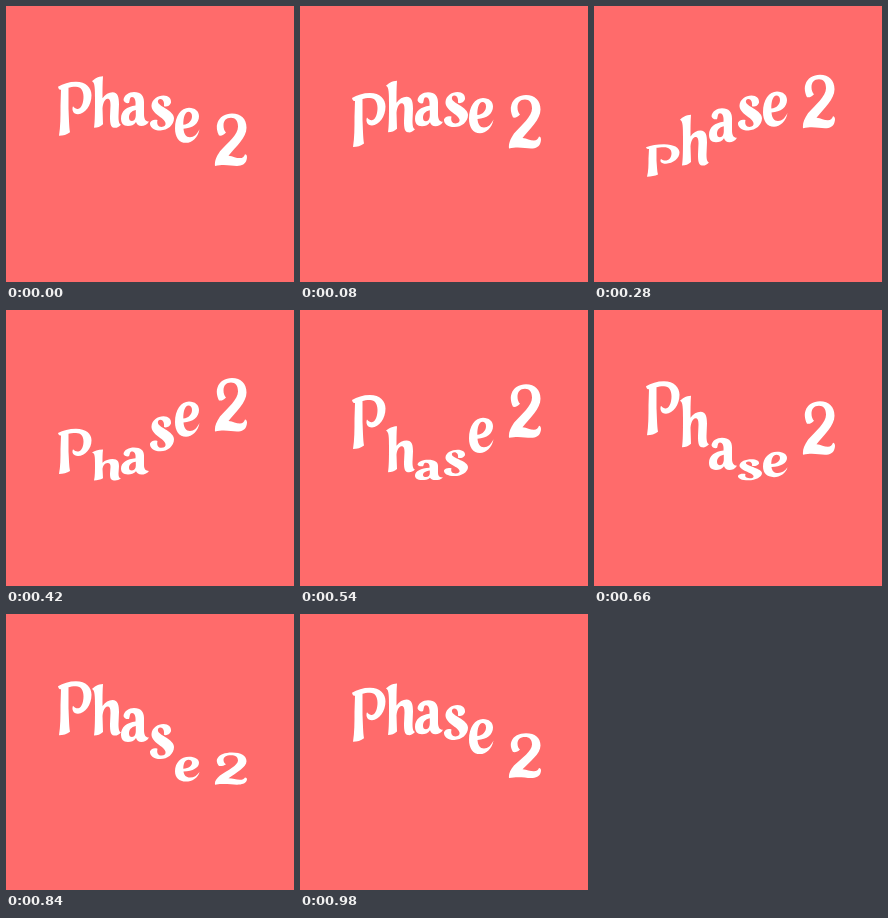
Animation of 288 by 276 pixels, one loop 1 s. Source, as an HTML page:

```html
<!DOCTYPE html>
<html lang="en">
<head>
<meta charset="utf-8">
<title>Phase 2</title>
<style>
html, body { margin: 0; width: 100%; height: 100%; overflow: hidden; background: #ff6b6b; }
svg { display: block; width: 288px; height: 276px; fill: #fff; fill-rule: evenodd; }
</style>
</head>
<body>
<svg viewBox="0 0 288 276" role="img" aria-label="Phase 2"></svg>
<script>
// Letter outlines: x on the stage, y from the middle of the line.
const letters = [
  // P
  `M52 -22C57 -25 63 -27 70 -27C80 -27 85.5 -21 85.5 -13.5C85.5 -3 79 5 72 5.5
   C67 5.5 65.5 1 67 -2.5C69 0 71 .5 72.5 0C76 -1 77.5 -7 77.5 -12C77.5 -18 75 -22 70 -22
   C66.5 -22 64 -21.5 62.5 -21L62.5 0C63 10 63 17 64 23.5C61 26 57 27 53 27
   C54.5 18 54.5 8 54.5 -3L55 -19C53.5 -19 52.5 -19.5 52 -22Z`,
  // h
  `M86 -20C88 -22 92 -25 97 -25C96.5 -18 96.5 -11 96.5 -3C99 -7 103 -9 106.5 -9
   C112 -9 113 -4 113 3L112.5 15C112.5 20 113 22.5 115 23.5C113 26 110 27 108 26.5
   C104.5 26 104 22 104 15L104.5 4C104.5 0 104 -2.5 101.5 -2.5C98.5 -2 97 2 96.5 7
   L97 23C94.5 25.5 91.5 26.5 88 26.5C89 20 89 10 89 -2C89 -12 89 -19 86 -20Z`,
  // a
  `M117.5 0C118 -5 123 -8 128 -8C135 -8 138 -4 138 2L138 14C138 19 139.5 21.5 143 21.5
   C141 25 138 26 135.5 26C132.5 26 131 24.5 130 22C128 25 125 26 122 26C117 26 115 23 115 18.5
   C115 11 121 6.5 129.5 5.5C130 0 128.5 -3 126 -3C123.5 -3 124 .5 123 3C120.5 3.5 118 2.5 117.5 0Z
   M129.8 10C125 11 123 14 123 17.5C123 20 124.2 21 126 21C128.5 21 129.8 18 129.8 15Z`,
  // s
  `M165 -1.2C163.5 2.3 160.5 3.2 158 2.3C158.5 -2 157 -5 154.5 -5C152.5 -5 151.5 -3.3 152 -1.6
   C153.5 3.2 168 6.6 168 14.4C168 21.3 161.5 26.5 154.5 26.5C147.5 26.5 143.5 23 144 18.7
   C145.5 15.7 148.5 15.2 151.5 16.1C150.5 20.4 152 23 155.5 23C158.5 23 160 21.3 159.5 19.1
   C158.5 13.5 145 10 145.5 1.4C146 -4.6 151.5 -8.5 157.5 -8.5C162.5 -8.5 165.5 -5.5 165 -1.2Z`,
  // e
  `M193.5 13C192 21.5 186 26.7 180 26.7C173 26.7 169 21 169 12C169 0 175 -8.5 183 -8.5
   C189 -8.5 193 -5 193 0C193 7 187 12 177.5 12.5C178 18 180 21 184 21C188 21 191 18 193.5 13Z
   M177.3 8.5C183 8 186 4 186 0C186 -3 184.5 -4.5 182.5 -4.5C179 -4.5 177.3 1 177.3 8.5Z`,
  // 2
  `M213 -4C211 -8 210 -13 211.5 -17C213.5 -23 219 -26.5 226 -26.5C235 -26.5 240.5 -21 240.5 -12
   C240.5 -2 230 7 222.5 16.5C227 17 230 19 234 19C236.5 19 238 17.5 239 15C241 15 241.5 18 240.5 21
   C239.5 25 236 27 231 27C225 27 219 25 209 27C208.5 22 210 18 214 12C222 3 232 -5 232 -13
   C232 -19 229.5 -22 225 -22C220 -22 217.5 -19 217.5 -14C217.5 -11 218.5 -8.5 220 -7
   C218 -4.5 215.5 -3.5 213 -4Z`
];

const LOOP = 1000, STEP = 20;
const FIRST_LANDING = 304, DELAY = 112;
const CONTACT = 138;            // ms on the ground, each side of the landing
const TOP = 94, TOUCH = 132.5, FLOOR = 154.5;

const paths = letters.map(d => {
  const path = document.createElementNS("http://www.w3.org/2000/svg", "path");
  path.setAttribute("d", d);
  return document.querySelector("svg").appendChild(path);
});

// Height and vertical squash at a distance in ms from the landing.
function bounce(gap) {
  if (gap < CONTACT) {
    const k = (gap / CONTACT) ** 3;
    return [FLOOR + (TOUCH - FLOOR) * k, 0.6 + 0.4 * k];
  }
  const k = (LOOP / 2 - gap) / (LOOP / 2 - CONTACT);
  return [TOP + (TOUCH - TOP) * k ** 2.4, 1];
}

function draw(now) {
  const t = Math.floor(now % LOOP / STEP) * STEP;
  paths.forEach((path, i) => {
    const away = Math.abs(t - FIRST_LANDING - i * DELAY);
    const [y, squash] = bounce(Math.min(away, LOOP - away));
    path.setAttribute("transform", `translate(0 ${y}) scale(1 ${squash})`);
  });
}

const start = performance.now();
function tick() {
  draw(performance.now() - start);
  requestAnimationFrame(tick);
}
tick();
</script>
</body>
</html>
```
